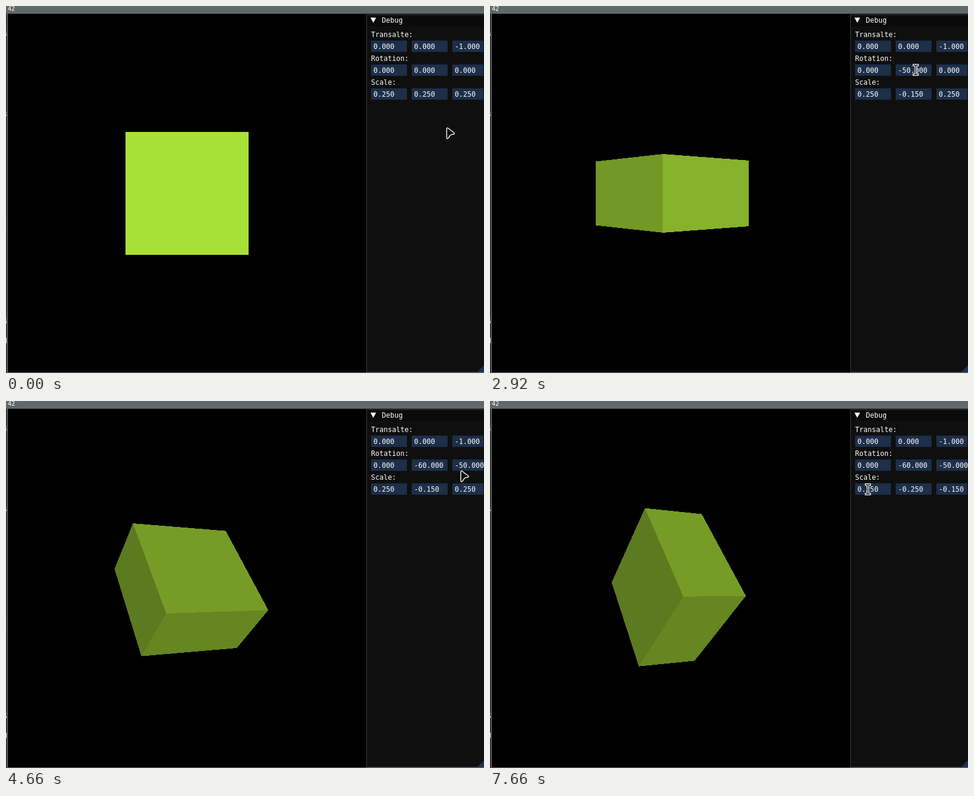
Recreate the animation shown at these times as an HTML page. Size 800 by 615 pixels, loop 8 s.

```html
<!DOCTYPE html>
<html lang="en">
<head>
<meta charset="utf-8">
<title>Cube transform panel</title>
<style>
  html, body { margin: 0; width: 100%; height: 100%; overflow: hidden; background: #000; }
  svg { display: block; position: absolute; left: 0; top: 0; }
  text { font: 11.63px "DejaVu Sans Mono", monospace; fill: #fff; white-space: pre; }
  .crisp { shape-rendering: crispEdges; }
  .small { font-size: 10px; }
  .edge { font-size: 13px; fill: #c4c8c9; }
</style>
</head>
<body>
<svg width="800" height="615" viewBox="0 0 800 615">
  <defs>
    <clipPath id="strip"><rect width="1" height="615"/></clipPath>
    <path id="beamShape" fill="none" stroke-linecap="square"
      d="M-3 -8H-1.8Q0 -8 0 -6V6Q0 8 -1.8 8H-3M3 -8H1.8Q0 -8 0 -6V6Q0 8 1.8 8H3"/>
  </defs>

  <g class="crisp">
    <rect width="800" height="615"/>
    <path d="M0 0H800V13H3V614H800V615H1V13H0Z" fill="#61686a"/>
  </g>
  <text class="small" x="3" y="8">42</text>
  <g id="scraps" clip-path="url(#strip)"></g>

  <g id="cube" class="crisp"></g>

  <g class="crisp">
    <rect x="603" y="14" width="197" height="600" fill="#3b3b40"/>
    <rect x="604" y="15" width="196" height="598" fill="#0f0f0f"/>
    <rect x="604" y="15" width="196" height="19" fill="#0a0a0a"/>
  </g>
  <path d="M800 602V613H789Z" fill="#1c3352"/>
  <path d="M610 19.5H619.5L614.7 28Z" fill="#fff"/>
  <text x="629" y="28">Debug</text>
  <g id="panel"></g>

  <path id="arrow" fill="#0f0f0f" stroke="#fff" stroke-width="1.4" stroke-linejoin="round"
    d="M.5 1.2Q.5 -1.8 3 -.3L12.4 7Q14.8 9.2 12 9.8L8.2 10.6Q7 11 6.2 12.2L3.6 16Q.9 18.8 .5 15.3Z"/>
  <g id="beam">
    <use href="#beamShape" stroke="#fff" stroke-width="3.8"/>
    <use href="#beamShape" stroke="#111" stroke-width="1.4"/>
  </g>
</svg>

<script>
const LOOP = 8000;
const HOP = 60; // ms between two cursor positions
const MOVE = 0, TURN = 1, SCALE = 2;
const LABELS = ["Transalte:", "Rotation:", "Scale:"];
const START = [[0, 0, -1], [0, 0, 0], [0.25, 0.25, 0.25]];
const TICK = { [TURN]: 10, [SCALE]: 0.1 };

const drag = (from, until, row, col, to) => ({ from, until, row, col, to });
const DRAGS = [
  drag(1320, 1440, SCALE, 1, -0.15),
  drag(2620, 2740, TURN, 1, -40),
  drag(2920, 3000, TURN, 1, -60),
  drag(3880, 3940, TURN, 2, -20),
  drag(4160, 4400, TURN, 2, -50),
  drag(5500, 5500, SCALE, 2, 0.15),
  drag(5580, 5720, SCALE, 2, -0.15),
  drag(6880, 6880, SCALE, 1, -0.25)
];

const glide = (from, until, x, y) => ({ from, until, x, y });
const GLIDES = [
  glide(20, 500, 723, 154),
  glide(700, 900, 723, 148),
  glide(1700, 1700, 723, 144),
  glide(1880, 2000, 715, 103),
  glide(2240, 2300, 712.5, 107),
  glide(3220, 3360, 768, 99),
  glide(4660, 4780, 746, 156),
  glide(4980, 5120, 757, 146),
  glide(6100, 6540, 708, 147),
  glide(7320, 7660, 632.5, 148)
];

const field = (row, col) => {
  const x = 611 + 68 * col;
  return { x, y: 58 + 40 * row, width: Math.min(60, 799 - x), height: 19 };
};

const byId = id => document.getElementById(id);
function add(parent, tag, attrs, text = "") {
  const el = document.createElementNS("http://www.w3.org/2000/svg", tag);
  for (const key in attrs) el.setAttribute(key, attrs[key]);
  el.textContent = text;
  return parent.appendChild(el);
}

// cut-off letters of the window behind
for (const [y, ch] of [[50, "s"], [185, "s"], [374, "["], [532, "S"], [563, "g"], [581, "-"]])
  add(byId("scraps"), "text", { class: "edge", x: -5.5, y }, ch);

const panel = byId("panel"), fields = [];
const cells = LABELS.map((label, row) => {
  add(panel, "text", { x: 611, y: field(row, 0).y - 6 }, label);
  return [0, 1, 2].map(col => {
    const box = field(row, col);
    fields.push(box);
    add(panel, "rect", { ...box, fill: "#1d2f49", class: "crisp" });
    return add(panel, "text", { x: box.x + 4, y: box.y + 14 });
  });
});

// the six sides of a cube: axis and direction
const SIDES = [0, 1, 2].flatMap(axis => [-1, 1].map(dir => ({
  axis, dir, el: add(byId("cube"), "polygon", {})
})));

const progress = (t, { from, until }) => t >= until ? 1 : (t - from) / (until - from);

// a drag jumps half its way at once, then goes on in whole ticks
function valuesAt(t) {
  const values = START.map(row => row.slice());
  for (const d of DRAGS) {
    if (t < d.from) break;
    const was = values[d.row][d.col], tick = TICK[d.row];
    const total = Math.round((was - d.to) / tick);
    const done = Math.floor(total * (1 + progress(t, d)) / 2);
    values[d.row][d.col] = was - tick * done;
  }
  return values;
}

function cursorAt(t) {
  let x = 737, y = 205;
  for (const g of GLIDES) {
    if (t < g.from) break;
    const hops = Math.max(1, Math.round((g.until - g.from) / HOP));
    const k = (Math.floor(progress(t, g) * hops) + 1) / (hops + 1);
    x += (g.x - x) * k;
    y += (g.y - y) * k;
  }
  return [x, y];
}

function turn(a, b, deg) {
  const r = deg * Math.PI / 180, c = Math.cos(r), s = Math.sin(r);
  return [a * c - b * s, a * s + b * c];
}

function rotate([x, y, z], [rx, ry, rz]) {
  [x, y] = turn(x, y, rz);
  [z, x] = turn(z, x, ry);
  [y, z] = turn(y, z, rx);
  return [x, y, z];
}

const FOCAL = 300 / Math.tan(Math.PI / 8); // 45 degree view, 600 px high
const BASE = [169, 224, 56];

function drawCube([move, angles, scale]) {
  for (const { axis, dir, el } of SIDES) {
    const point = (a, b) => {
      const p = [];
      p[axis] = dir;
      p[(axis + 1) % 3] = a;
      p[(axis + 2) % 3] = b;
      return p;
    };
    const corners = [[-1, -1], [1, -1], [1, 1], [-1, 1]].map(([a, b]) => {
      const sized = point(a, b).map((n, i) => n * Math.abs(scale[i]) / 2);
      return rotate(sized, angles).map((n, i) => n + move[i]);
    });
    const normal = rotate(point(0, 0), angles);
    const facing = normal.reduce((sum, n, i) => sum + n * corners[0][i], 0) < -1e-6;
    el.style.display = facing ? "" : "none";
    if (!facing) continue;
    const light = Math.min(1, 0.08 + 0.93 * Math.max(0, normal[2]));
    el.setAttribute("fill", `rgb(${BASE.map(n => Math.round(n * light))})`);
    el.setAttribute("points", corners.map(([x, y, z]) =>
      `${(303 - FOCAL * x / z).toFixed(2)},${(314 + FOCAL * y / z).toFixed(2)}`).join(" "));
  }
}

function drawCursor([x, y]) {
  const over = fields.some(f => x >= f.x && x < f.x + f.width && y >= f.y && y < f.y + f.height);
  byId("beam").style.display = over ? "" : "none";
  byId("arrow").style.display = over ? "none" : "";
  byId(over ? "beam" : "arrow").setAttribute("transform", `translate(${x} ${y})`);
}

function frame(now) {
  const t = now % LOOP;
  const values = valuesAt(t);
  values.forEach((row, r) => row.forEach((n, c) => {
    const s = n.toFixed(3);
    if (cells[r][c].textContent !== s) cells[r][c].textContent = s;
  }));
  drawCube(values);
  drawCursor(cursorAt(t));
  requestAnimationFrame(frame);
}
frame(performance.now());
</script>
</body>
</html>
```
